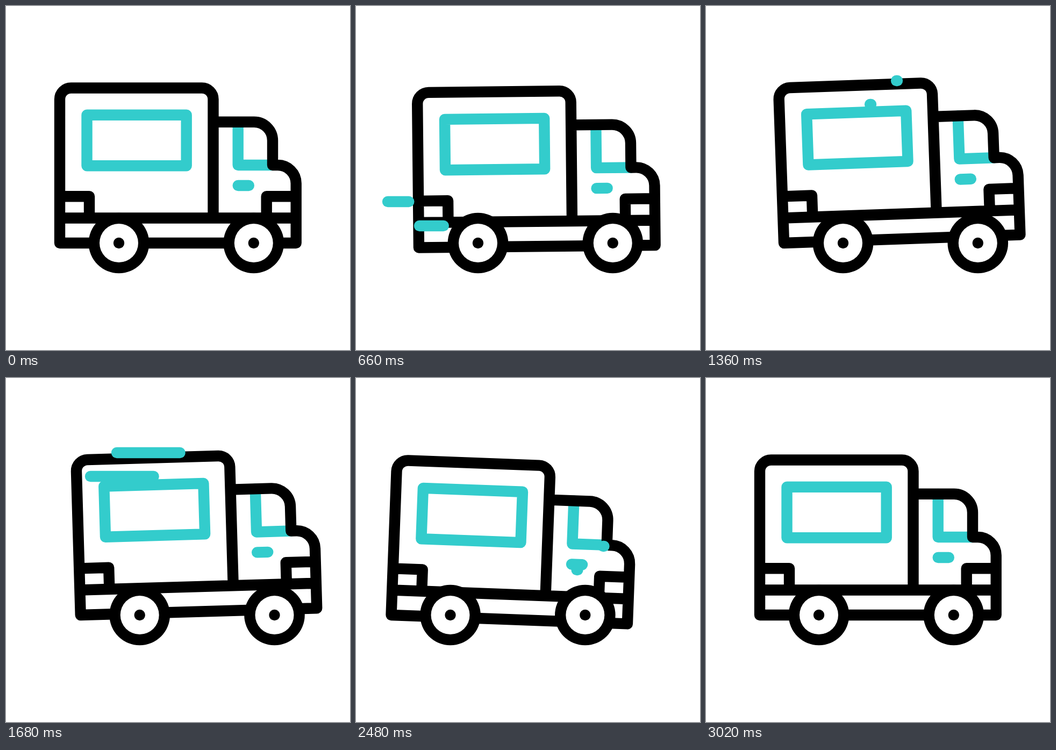
Write an HTML page with a canvas that moves like this. It is 640 px wide and 640 px high and loops after 3.6 s.

```html
<!DOCTYPE html>
<html lang="en">
<head>
<meta charset="utf-8">
<title>Truck</title>
<style>
html, body { margin: 0; width: 100%; height: 100%; overflow: hidden; background: #fff; }
canvas { display: block; width: 640px; height: 640px; }
</style>
</head>
<body>
<canvas id="stage" width="640" height="640"></canvas>
<script>
const ctx = document.getElementById('stage').getContext('2d');
const LOOP = 3600, STEP = 20, LINE = 20.4;
const TEAL = '#33cccc', BLACK = '#000', WHITE = '#fff';

// truck at rest: main edges
const LEFT = 100, RIGHT = 539.7, ROOF = 152.5, WALL = 385.5;
const DECK = 394.5, BASE = 441, LAMP = 55;
const WHEELS = [210, 460.8];

// streak pairs: first right end, step to the second, length
const SIDE = { x: 188, y: 364, dx: 77, dy: 45, len: 129, grow: 18 };
const NOSE = { x: 538, y: 314, dx: -46, dy: 47, len: 156, grow: 0 };
const HIGH = { x: 356, y: 139, dx: -49, dy: 44, len: 150, grow: 0 };
const LOW = { ...HIGH, x: HIGH.x + 105.5, y: HIGH.y + 174 };
const GUSTS = [SIDE, NOSE, HIGH, SIDE, LOW];
const FIRST = 220, BEAT = 560, SWEEP = 300, LAG = 250;

const clamp = v => Math.min(1, Math.max(0, v));
const ease = v => { v = clamp(v); return v * v * (3 - 2 * v); };
const ramp = (t, start, span) => ease((t - start) / span);

function stroke(color, build) {
  ctx.strokeStyle = color;
  ctx.beginPath();
  build();
  ctx.stroke();
}

function line(x, y, ...rest) {
  ctx.moveTo(x, y);
  for (let i = 0; i < rest.length; i += 2) ctx.lineTo(rest[i], rest[i + 1]);
}

function trim() {
  ctx.rect(150.5, 202.8, 185.2, 94.4);
  line(431.7, 216, 431.7, 296, 496, 296);
  line(431.7, 334, 451.8, 334);
}

function frame() {
  line(RIGHT, BASE, LEFT, BASE);
  ctx.arcTo(LEFT, ROOF, WALL, ROOF, 21);
  ctx.arcTo(WALL, ROOF, WALL, DECK, 21);
  ctx.lineTo(WALL, DECK);
  line(LEFT, DECK, RIGHT, DECK);
  line(WALL, 215.8);
  ctx.arcTo(496, 215.8, 496, 296, 34.5);
  ctx.lineTo(496, 296);
  ctx.arcTo(RIGHT, 296, RIGHT, BASE, 34);
  ctx.lineTo(RIGHT, BASE);
  line(LEFT, 354.3, LEFT + LAMP, 354.3, LEFT + LAMP, DECK);
  line(RIGHT, 354.3, RIGHT - LAMP, 354.3, RIGHT - LAMP, DECK);
}

function disc(x, r, color) {
  ctx.fillStyle = color;
  ctx.beginPath();
  ctx.arc(x, BASE, r, 0, Math.PI * 2);
  ctx.fill();
}

function wheel(x) {
  disc(x, 56.3, BLACK);
  disc(x, 36, WHITE);
  disc(x, 10.2, BLACK);
}

function bounce(t) {
  if (t < 560 || t > 2480) return 0;
  return 5 - 5 * Math.cos((t - 560) / 80 * Math.PI);
}

function drawTruck(t) {
  const back = ramp(t, 0, 400), dash = ramp(t, 400, 400);
  const retreat = ramp(t, 1585, 600), home = ramp(t, 2185, 835);
  const shift = -54.5 * back + 99.5 * dash - 93.3 * retreat + 48.3 * home;
  const tilt = 3 * back - 5 * dash + 5 * retreat - 3 * home;

  ctx.save();
  ctx.translate(shift, 0);
  ctx.save();
  ctx.translate(LEFT, BASE + bounce(t));
  ctx.rotate(tilt * Math.PI / 180);
  ctx.translate(-LEFT, -BASE);
  stroke(TEAL, trim);
  stroke(BLACK, frame);
  ctx.restore();
  WHEELS.forEach(wheel);
  ctx.restore();
}

function drawGust(g, age) {
  if (age <= 0 || age >= SWEEP + LAG) return;
  const head = ramp(age, 0, SWEEP), tail = ramp(age, LAG, SWEEP);
  for (let row = 0; row < 2; row++) {
    const x = g.x + g.dx * row, y = g.y + g.dy * row, len = g.len + g.grow * row;
    stroke(TEAL, () => line(x - len * tail, y, x - len * head, y));
  }
}

function draw(t) {
  ctx.fillStyle = WHITE;
  ctx.fillRect(0, 0, 640, 640);
  ctx.lineWidth = LINE;
  ctx.lineCap = ctx.lineJoin = 'round';
  drawTruck(t);
  GUSTS.forEach((g, i) => drawGust(g, t - FIRST - BEAT * i));
}

const begin = performance.now();
function tick() {
  const t = (performance.now() - begin) % LOOP;
  draw(Math.floor(t / STEP) * STEP);
  requestAnimationFrame(tick);
}
tick();
</script>
</body>
</html>
```
